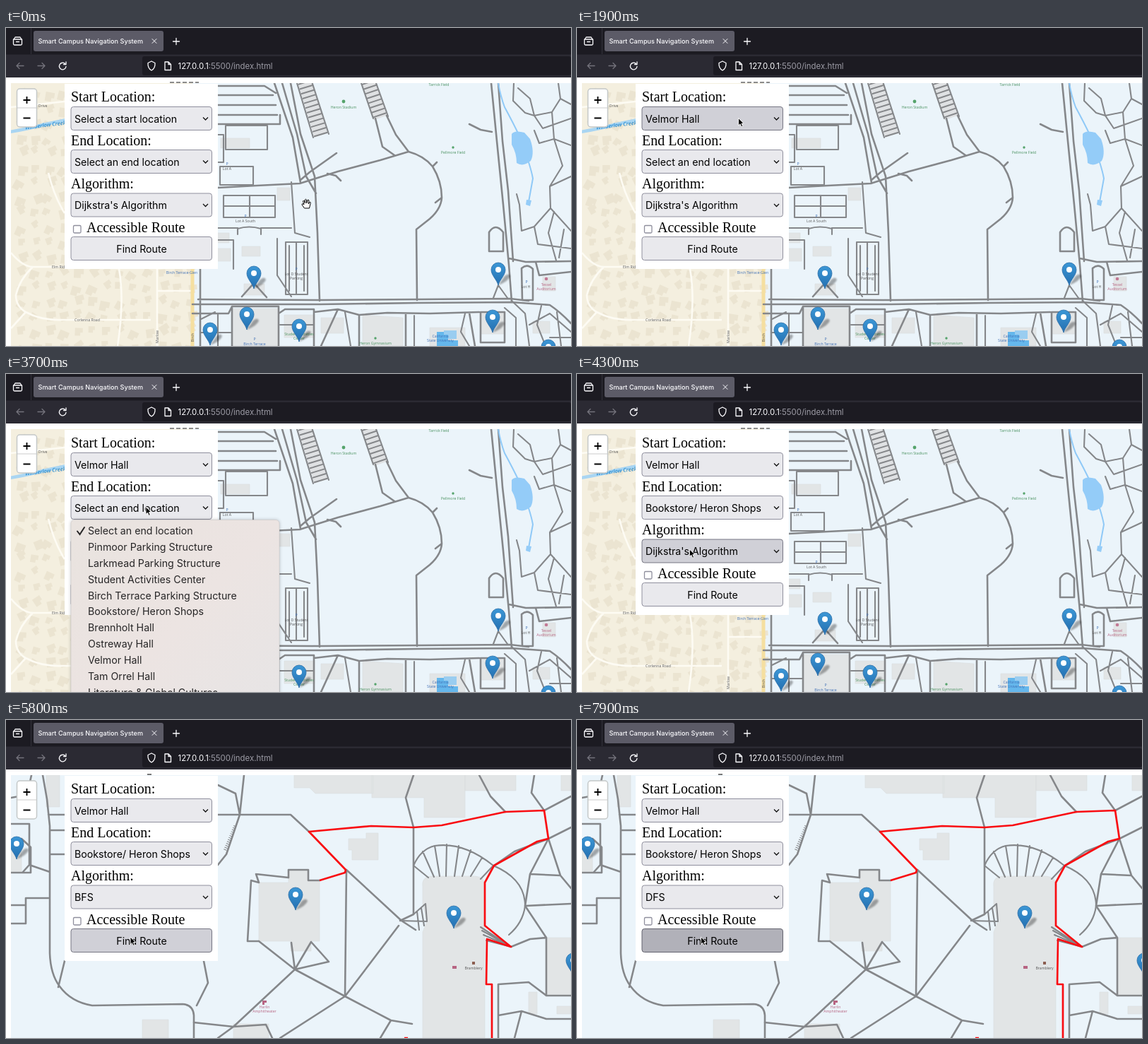
Write an HTML page that moves like this. It is 800x450 px and loops after 8 s.

```html
<!DOCTYPE html>
<html lang="en">
<head>
<meta charset="utf-8">
<title>Smart Campus Navigation System</title>
<style>
html, body { margin: 0; width: 100%; height: 100%; overflow: hidden; background: #fff; }
svg { display: block; width: 100vw; height: 100vh; }
text { font-family: Inter, sans-serif; }
.ui text { font-size: 14.2px; fill: #000; }
.ui .label { font: 20px "Liberation Serif", serif; }
.road { fill: none; stroke: #85878a; stroke-width: 2.6; stroke-linejoin: round; stroke-linecap: round; }
.thin { stroke-width: 2.1; }
.street { fill: none; stroke: #fdfbf3; stroke-width: 2.6; }
.building { fill: #e2e5e6; stroke: #d8dcdd; stroke-width: .6; }
.names text { font: 5.2px "Open Sans", sans-serif; fill: #555; text-anchor: middle; }
.names .green { fill: #49915f; }
.names .blue { fill: #3f6fb5; }
.names .pink { fill: #b76482; }
.names .creek { font-size: 7.6px; font-style: italic; font-weight: 600; fill: #268bd0; }
.line { fill: none; stroke: #fbfbfe; stroke-width: 1.3; stroke-linecap: round; stroke-linejoin: round; }
</style>
</head>
<body>
<svg viewBox="0 0 800 450" preserveAspectRatio="none">
<defs>
  <clipPath id="mapArea"><path d="M7 78H800V450H7Z"/></clipPath>
  <linearGradient id="pinBlue" x2="0" y2="1"><stop stop-color="#3c97d6"/><stop offset="1" stop-color="#246fb0"/></linearGradient>
  <linearGradient id="menuTint" x2="1" y2="1"><stop stop-color="#e9e3df"/><stop offset=".5" stop-color="#ece4e2"/><stop offset="1" stop-color="#e6e5e6"/></linearGradient>
  <filter id="soft" x="-20%" y="-20%" width="140%" height="150%"><feGaussianBlur stdDeviation="2.5"/></filter>
  <filter id="pinSoft" x="-30%" y="-30%" width="160%" height="160%"><feGaussianBlur stdDeviation="1.2"/></filter>
  <g id="pin">
    <path d="M0 0L9-13Q15-18 17-13Q15-6 0 0Z" opacity=".32" filter="url(#pinSoft)"/>
    <path d="M0 0C-2-8-10-14-10-22A10 10 0 0 1 10-22C10-14 2-8 0 0Z" fill="url(#pinBlue)" stroke="#2a6da6" stroke-width=".8"/>
    <circle cy="-22" r="4" fill="#fff"/>
  </g>
</defs>
<rect width="800" height="450" fill="#fff"/>

<g id="campus">
<g clip-path="url(#mapArea)">
  <rect width="800" height="450" fill="#ebf4fa"/>
  <path d="M0 70H264V450H0Z" fill="#f4efdf"/>
  <g id="houses" fill="#ebe4d1"/>
  <path class="street" d="M7 112L83 104M60 205Q68 238 83 262M7 318Q24 338 38 338H105M38 338Q19 356 14 378Q14 394 28 402L7 425M28 402Q50 414 80 413H205M160 341Q168 385 158 450M214 341V450M214 372H262"/>
  <path d="M264 341V450" stroke="#f5dfa0" stroke-width="5"/>
  <path d="M5 147Q35 142 52 137L90 129" fill="none" stroke="#a9d5f2" stroke-width="4.5"/>
  <path class="building" d="M320 397H386V450H320ZM394 406H437V438H394ZM505 406L562 410V450H505ZM600 440V424H650V450H600ZM672 402H705V433H672ZM337 362H366V378H337ZM304 156H345V170H304ZM760 352H778V372H760ZM446 410H478V432H446ZM284 290H316V304H284ZM282 312H318V330H282ZM334 309H360V323H334ZM746 415H770V432H746ZM384 226H402V244H384Z"/>
  <path d="M610 430H626V442H640V450H610Z" fill="#65b7ec"/>
  <path d="M620 428H638V440H626V434H620Z" fill="#9acdf0"/>

  <g fill="none" stroke="#dfe1e3" stroke-width="20"><path d="M423 76L446 152"/><path d="M513 76L530 127"/></g>
  <g fill="none" stroke="#85878a" stroke-width="20" stroke-dasharray="2 5"><path d="M423 76L446 152"/><path d="M513 76L530 127"/></g>
  <path class="road thin" d="M412 78L435 155M433 76L457 150M503 78L520 128M524 78L541 125"/>

  <path class="road" d="M300 82H366L382 92M300 95H378M300 109H382M300 123H384M300 136H388V123M380 78L406 155L417 219M391 78L412 150L425 210L439 234M403 78L417 150L437 210L441 290L444 386M300 226L355 223L416 220L435 214L470 203L530 187L570 175M417 215L430 204L468 177M455 206L467 209L474 216M523 128L533 168L550 180M539 124L552 151L570 175Q592 181 604 196Q617 217 617 240Q616 256 600 270L581 285L582 385M604 196L610 190M617 240L608 247"/>
  <path class="road thin" d="M300 151H308V190H300M311 138H370V172H311ZM303 196H350V222H303ZM308 237H381V268H308ZM308 252H381M345 237V268M328 292V284Q344 279 361 284V292M300 283H328M361 283H404M396 303H427V377H396ZM411 303V377M401 308V372M422 308V372M404 218L409 290L430 296M384 298V350L404 380M300 300H322V341"/>
  <path class="road" d="M264 391H445L583 389L716 388L770 392Q785 402 800 418M272 384L443 385L583 384L714 383L740 386M275 341V450M264 404H315L320 394V450M320 394H386V450M334 380L351 361L369 381M386 404L395 398H436V450M436 402L470 398L500 406L540 403L600 404L670 402M470 398L446 450M500 406V450M566 404V450M656 403L664 450M672 402H706V445H672Z"/>
  <path class="road thin" d="M276 412L296 402M275 431H320M300 404V450M388 420H436M480 402L488 450M578 407V450M650 404L644 430L656 450M706 396L722 410V450M716 386L735 404L741 450M741 420L770 404L800 430M758 393L752 420L764 450M690 382L697 364L710 382M780 402L786 450M770 438H800"/>
  <path class="road" d="M687 78L695 160L704 250L712 335L716 387M656 136L672 144L688 147M697 78L703 160L711 230L718 330M684 289Q693 275 704 289V316H684ZM730 340Q738 333 746 341V385H731ZM712 326L736 331L800 330M750 331L755 350L800 345"/>
  <path class="road thin" d="M719 78L718 103L735 120L748 124L773 119L785 100L782 78M748 124L742 100L725 85M773 119L776 157L800 166M776 157L755 163L748 145M748 124L760 142L800 128M785 100L800 108M776 157L788 195L770 224L771 255L800 287M770 224L800 210M771 255L748 281L730 287L727 250L723 235M748 281L753 306L800 312M776 260L768 290L779 329M790 285L783 325"/>
  <path d="M697 78Q700 96 706 112Q718 134 727 153Q743 195 746 213L740 246" fill="none" stroke="#8fc9f7" stroke-width="2"/>
  <path d="M716 150Q720 144 734 148L742 157Q749 176 743 188Q732 197 723 191Q723 177 716 165ZM737 243L744 244L742 252L736 250Z" fill="#94ccf8"/>
  <g class="names">
    <text x="47" y="112">ook Drive</text><text x="77" y="340">Elm Ridge</text><text x="115" y="415">Corlenna Road</text>
    <text transform="translate(216 437) rotate(-90)">Marlow</text><text transform="translate(266 438) rotate(-90)">Birch</text>
    <text class="creek" transform="translate(56 140) rotate(-7)">Winderlow Creek</text>
    <text class="blue" x="249" y="348">Birch Terrace-Glen</text>
    <text class="green" x="478" y="114">Heron Stadium</text><text class="green" x="613" y="82">Tarrick Field</text>
    <text class="green" x="633" y="178">Pellmore Field</text><text class="green" x="523" y="448">Heron Gymnasium</text>
    <text x="313" y="201">Lot A</text><text x="339" y="275">Lot A South</text><text x="411" y="350">Lot D Student</text><text x="411" y="356">Parking</text>
    <text class="green" x="415" y="435">Student Activities</text><text class="green" x="415" y="441">Center</text>
    <text class="blue" x="352" y="449">Birch Terrace</text><text class="blue" x="615" y="438">California</text><text class="blue" x="615" y="444">State University</text>
    <text x="736" y="368">Lot H</text><text class="pink" x="765" y="365">Tessel</text><text class="pink" x="765" y="371">Auditorium</text>
    <text class="blue" x="313" y="194">P</text><text class="blue" x="339" y="268">P</text><text class="blue" x="411" y="343">P</text><text class="blue" x="737" y="361">P</text><text class="blue" x="352" y="442">P</text>
  </g>
  <g fill="#55a36b"><circle cx="478" cy="104" r="2.4"/><circle cx="633" cy="169" r="1.7"/><circle cx="523" cy="439" r="1.7"/></g>
  <circle cx="765" cy="355" r="2.3" fill="#c27895"/>
  <use href="#pin" x="351" y="369"/><use href="#pin" x="697" y="364"/><use href="#pin" x="341" y="427"/><use href="#pin" x="689" y="431"/><use href="#pin" x="415" y="444"/><use href="#pin" x="289" y="449"/><use href="#pin" x="768" y="473"/>
</g>
<path d="M232 77H273" stroke="#666" stroke-width="1.3" stroke-dasharray="6 3"/>
</g>

<g id="route">
<g clip-path="url(#mapArea)">
  <rect width="800" height="450" fill="#ddd"/>
  <g id="tiles">
    <rect width="800" height="450" fill="#ebf4fa"/>
    <path class="building" d="M358 230H400V212H428V227H444V313H432V327H403V313H358ZM590 236Q588 222 602 221H664Q679 222 678 236V450H590V300L596 285L590 260ZM765 308H800V390H765ZM7 168H22V216H7ZM57 78H76V123H57ZM408 78H520V104H438L430 96H408ZM518 78H650V138H592V110H518ZM485 168H510V160H527V198H490V184H485ZM650 78H722V100H650ZM786 78H800V100H786ZM322 430H372V450H322ZM740 385H752V416H740ZM780 405H800V416H780ZM193 424H230V450H193Z"/>
    <g class="names">
      <text class="pink" x="366" y="408">Harlin</text><text class="pink" x="366" y="414">Amphitheater</text>
      <text x="662" y="353">Bramblery</text>
    </g>
    <path d="M363 397H369V400H366V403H363ZM632 348H638V352H632Z" fill="#b76482"/><rect x="660" y="342" width="4" height="4" fill="#8c5e51"/>
  </g>
  <path class="road" d="M52 78L58 112L62 150V330Q63 360 76 377Q92 399 122 404L250 402Q265 403 266 418V450M60 134H83M62 156H83M62 190H83M7 110L30 106L36 78M7 147H33V205L62 215M24 215L33 205M62 252H28V288H7M28 262H7M83 341L74 378M280 341L286 372L270 404"/>
  <path class="road" d="M300 134H403L429 158M337 78L331 134L312 190L300 205M331 134L325 104L300 92M482 212L480 391M482 212L560 284L580 297M577 152V275L558 284M354 218L358 230L347 227L342 313L358 313M354 218L400 223V212H428V227L444 227M409 353L404 315M409 353L432 314M409 353L358 313M409 353L457 342L432 314M409 353L322 434L300 450M409 353L480 391L545 425L575 430M480 391L556 291M322 434L368 431L377 450M480 391L388 450M545 425L530 450M266 428L322 434"/>
  <path class="road thin" d="M577 206Q587 183 607 178Q648 172 690 206Q735 225 735 263Q732 287 712 304M577 206L598 223M590 186L606 222M607 178L614 221M624 176L623 221M641 178L635 221M658 184L646 221M674 195L658 221M690 206L672 225M577 275L594 260L596 285L558 284M582 271L585 297M588 266L592 291M672 293L715 321M674 298L715 321M676 304L715 321M680 312L715 321"/>
  <path class="road" d="M707 130L686 108L670 78M762 128L744 103L748 78M762 128L800 108M768 168L800 152M768 168L742 218L735 263L800 260M768 168L785 220L800 238M742 218L785 220M691 206L720 186L768 168M715 321L742 310L765 308V390L740 371L697 374V450M697 418L730 412L765 423H800M730 412L720 450M765 390H800M735 263L765 308M577 152L566 110L577 78M22 168L35 180V216H7"/>
  <path d="M310 184L325 148" stroke="#85878a" stroke-width="4" stroke-dasharray="1 2"/>
  <path d="M444 227L480 216L481 212L429 158L517 150L577 152L617 149L707 130L762 128L768 168L752 172L691 206L678 230V291L715 321L681 310L680 374H688V450M564 450H569" fill="none" stroke="#f90d12" stroke-width="2.7" stroke-linejoin="round"/>
  <use href="#pin" x="15" y="197"/><use href="#pin" x="410" y="269"/><use href="#pin" x="634" y="295"/><use href="#pin" x="803" y="362"/>
</g>
<path d="M200 77H206" stroke="#555" stroke-width="1.6"/>
</g>

<g>
  <rect width="800" height="70" fill="#2b2a33"/><rect width="800" height="37.5" fill="#1c1b22"/>
  <rect x="193" y="40" width="607" height="27" rx="3" fill="#1c1b22"/>
  <path d="M35.5 0V37" stroke="#33323b"/>
  <rect x="39" y="4" width="184" height="29" rx="3" fill="#5c5b67"/>
  <g class="line">
    <path d="M10.500 16H22.500V22.500Q22.500 24 21 24H12Q10.500 24 10.500 22.500ZM11 16L13 13H20L22 16M14.500 19.500H18.500"/>
    <path d="M207 15.500L213 21.500M213 15.500L207 21.500" stroke-width="1"/><path d="M236.500 19H245.500M241 14.500V23.500"/>
    <path d="M25 53.500H15M19 49.500L15 53.500L19 57.500M45 53.500H55M51 49.500L55 53.500L51 57.500" style="stroke:#73727b"/>
    <path d="M83.500 50.500A4.800 4.800 0 1 0 85 54.500M85 48V51.500H81.500"/>
    <path d="M206 47L211 49.500Q211.500 57 206 60Q200.500 57 201 49.500ZM225 48H230L233.500 51.500V59.500H225ZM230 48V51.500H233.500"/>
  </g>
  <text x="45.5" y="22.3" font-size="9.15" font-weight="500" fill="#fbfbfe">Smart Campus Navigation System</text>
  <text x="243.5" y="57.8" font-size="11.4" fill="#9d9ca6"><tspan fill="#fbfbfe">127.0.0.1</tspan>:5500/index.html</text>
</g>

<g class="ui">
  <rect x="15.5" y="86" width="28" height="54" rx="4" fill="#fff" stroke="#c4c8c8" stroke-width="1.5"/>
  <path d="M16 113H43" stroke="#ccc"/><path d="M24.500 102H34.500M29.500 97V107M24.500 127.500H34.500" stroke="#000" stroke-width="1.8"/>
  <rect x="83" y="79" width="217" height="262" fill="#fff"/>
  <text class="label" x="92" y="104">Start Location:</text><text class="label" x="92" y="165.5">End Location:</text>
  <text class="label" x="92" y="227">Algorithm:</text><text class="label" x="114" y="289">Accessible Route</text>
  <rect x="95.5" y="279.5" width="10.5" height="10.5" rx="1.5" fill="#fff" stroke="#8f8f9d" stroke-width="1.3"/>
  <g id="controls"/><g id="menus"/>
</g>

<g id="cursor">
  <path id="arrow" d="M0 0V10.500L2.500 8.300L4.300 12.300L6.200 11.500L4.500 7.600H7.700Z" fill="#000" stroke="#fff" stroke-width=".9"/>
  <path id="hand" d="M-2.500 6L-6 1Q-6-1-4 0L-3 1L-4.500-4Q-3.500-6-2.500-4L-1.500-1L-1.700-6Q-.500-7.500.500-6L.800-1L2-5.500Q3.500-6.500 4-5L3.300 0L5-2.500Q6.500-3 6.300-1.500L4.500 6Z" fill="#fff" stroke="#000"/>
</g>
</svg>
<script>
const LOOP = 8000, ROW = 22.93;
const $ = id => document.getElementById(id);
function add(parent, tag, attrs, text = '') {
  const node = document.createElementNS('http://www.w3.org/2000/svg', tag);
  for (const key in attrs) node.setAttribute(key, attrs[key]);
  node.textContent = text;
  return parent.appendChild(node);
}
const show = (node, on) => node.setAttribute('display', on ? 'inline' : 'none');
const within = (t, [from, to]) => t >= from && t < to;
const clamp = u => Math.min(1, Math.max(0, u));

let seed = 7;
const random = () => (seed = seed * 16807 % 2147483647) / 2147483647;
for (let y = 86; y < 450; y += 21) for (let x = 14; x < 255; x += 20) {
  const size = 9 + random() * 5, px = x + random() * 5, py = y + random() * 6;
  add($('houses'), 'path', {
    d: `M0 0H${size}V${size * .6}H${size * .7}V${size}H0Z`,
    transform: `translate(${px} ${py}) rotate(${random() * 70 - 35})`
  });
}

const places = ['Pinmoor Parking Structure', 'Larkmead Parking Structure', 'Student Activities Center',
  'Birch Terrace Parking Structure', 'Bookstore/ Heron Shops', 'Brennholt Hall', 'Ostreway Hall', 'Velmor Hall',
  'Tam Orrel Hall', 'Literature & Global Cultures', 'Pedagogy Classrooms', 'Student Clinic and Counsel Services'];
const algorithms = ['Choose an algorithm:', 'BFS', 'DFS', "Dijkstra's Algorithm"];
const startHint = 'Select a start location', endHint = 'Select an end location';

// Each value is [time from which it is shown, text].
const controls = [
  { y: 111.5, values: [[0, startHint], [1850, places[7]]], presses: [[450, 1850]] },
  { y: 172.5, values: [[0, endHint], [3750, places[4]]], presses: [[2380, 2600]] },
  { y: 234, values: [[0, algorithms[3]], [5050, 'BFS'], [7050, 'DFS']], presses: [[4450, 5050], [6350, 7050]] },
  { y: 295.5, button: true, values: [[0, 'Find Route']], presses: [[5400, 5500], [7850, 8000]] }
];
for (const c of controls) {
  c.box = add($('controls'), 'rect', { x: 92, y: c.y, width: 199.5, height: 33, rx: 3.5, stroke: '#8f8f9d' });
  c.label = add($('controls'), 'text', { x: c.button ? 192 : 97, y: c.y + 22, 'text-anchor': c.button ? 'middle' : 'start' });
  if (!c.button) add($('controls'), 'path', { d: `M279 ${c.y + 15}l3.500 3.500l3.500-3.500`, fill: 'none', stroke: '#111', 'stroke-width': 1.3 });
}

// The highlight walks from item `checked` to item `pick` during `keys`.
const menus = [
  { open: [450, 1850], y: 145, width: 295, items: [startHint, ...places], checked: 0, pick: 8, keys: [850, 1300], flash: 1750, bar: true },
  { open: [2400, 3750], y: 206.5, width: 295, items: [endHint, ...places], checked: 0, pick: 5, keys: [2650, 3000], flash: 3650 },
  { open: [4450, 5050], y: 161.5, width: 200, items: algorithms, checked: 3, pick: 1, keys: [4600, 4850], flash: 4950 },
  { open: [6350, 7050], y: 207, width: 200, items: algorithms, checked: 1, pick: 2, keys: [6500, 6800], flash: 6950 }
];
for (const m of menus) {
  const g = m.group = add($('menus'), 'g', {}), height = m.items.length * ROW + 9;
  const frame = { x: 92, y: m.y, width: m.width, height, rx: 5 };
  add(g, 'rect', { ...frame, fill: '#000', opacity: .25, filter: 'url(#soft)' });
  add(g, 'rect', { ...frame, fill: 'url(#menuTint)', stroke: '#cfcaca', 'stroke-width': .6 });
  m.mark = add(g, 'rect', { x: 96, width: m.width - 9, height: ROW, rx: 3.5, fill: '#3b82dc' });
  m.rows = m.items.map((item, i) => add(g, 'text', { x: 116, y: m.y + 20.3 + i * ROW }, item));
  const tickY = m.y + 15 + m.checked * ROW;
  m.tick = add(g, 'path', { d: `M101 ${tickY + 1}l3.500 4.500l6.500-10`, fill: 'none', 'stroke-width': 2, 'stroke-linecap': 'round' });
  if (m.bar) add(g, 'rect', { x: 375, y: 149, width: 6, height: 268, rx: 3, fill: '#555', opacity: .62 });
}

const path = [[0, 425, 249], [80, 425, 249], [420, 228.5, 127.5], [1950, 228.5, 127.5], [2350, 198, 188],
  [3900, 198, 188], [4350, 158, 250], [4580, 158, 250], [4880, 158, 199], [5080, 158, 199], [5350, 176, 307],
  [5850, 176, 307], [6250, 177, 261], [6500, 177, 261], [6800, 177, 266], [7580, 177, 269], [7840, 175.5, 307], [8000, 175.5, 307]];
function cursorAt(t) {
  const i = path.findIndex(p => p[0] > t), [t0, x0, y0] = path[i - 1], [t1, x1, y1] = path[i];
  const u = (t - t0) / (t1 - t0), e = u * u * (3 - 2 * u);
  return [x0 + (x1 - x0) * e, y0 + (y1 - y0) * e];
}

function drawMenu(m, t) {
  const open = within(t, m.open);
  show(m.group, open);
  if (!open) return;
  const u = clamp((t - m.keys[0]) / (m.keys[1] - m.keys[0]));
  const current = t >= m.flash ? -1 : Math.round(m.checked + (m.pick - m.checked) * u);
  show(m.mark, current >= 0);
  m.mark.setAttribute('y', m.y + 3.8 + current * ROW);
  m.rows.forEach((row, i) => row.style.fill = i === current ? '#fff' : '#262526');
  m.tick.setAttribute('stroke', current === m.checked ? '#fff' : '#262526');
}

function draw() {
  const t = performance.now() % LOOP, [x, y] = cursorAt(t);
  const menuOpen = menus.some(m => within(t, m.open));
  for (const c of controls) {
    const hover = !menuOpen && x > 92 && x < 291 && y > c.y && y < c.y + 33;
    const pressed = c.presses.some(p => within(t, p));
    c.box.setAttribute('fill', pressed ? '#b1b1b9' : hover ? '#d0d0d7' : '#e9e9ed');
    c.box.setAttribute('stroke', pressed ? '#63636f' : hover ? '#767683' : '#8f8f9d');
    c.label.textContent = c.values.filter(v => v[0] <= t).pop()[1];
  }
  menus.forEach(m => drawMenu(m, t));
  show($('campus'), t < 5450);
  show($('route'), t >= 5450);
  $('tiles').setAttribute('opacity', clamp((t - 5450) / 250));
  $('cursor').setAttribute('transform', `translate(${x} ${y})`);
  show($('hand'), x > 300);
  show($('arrow'), x <= 300);
  requestAnimationFrame(draw);
}
draw();
</script>
</body>
</html>
```
